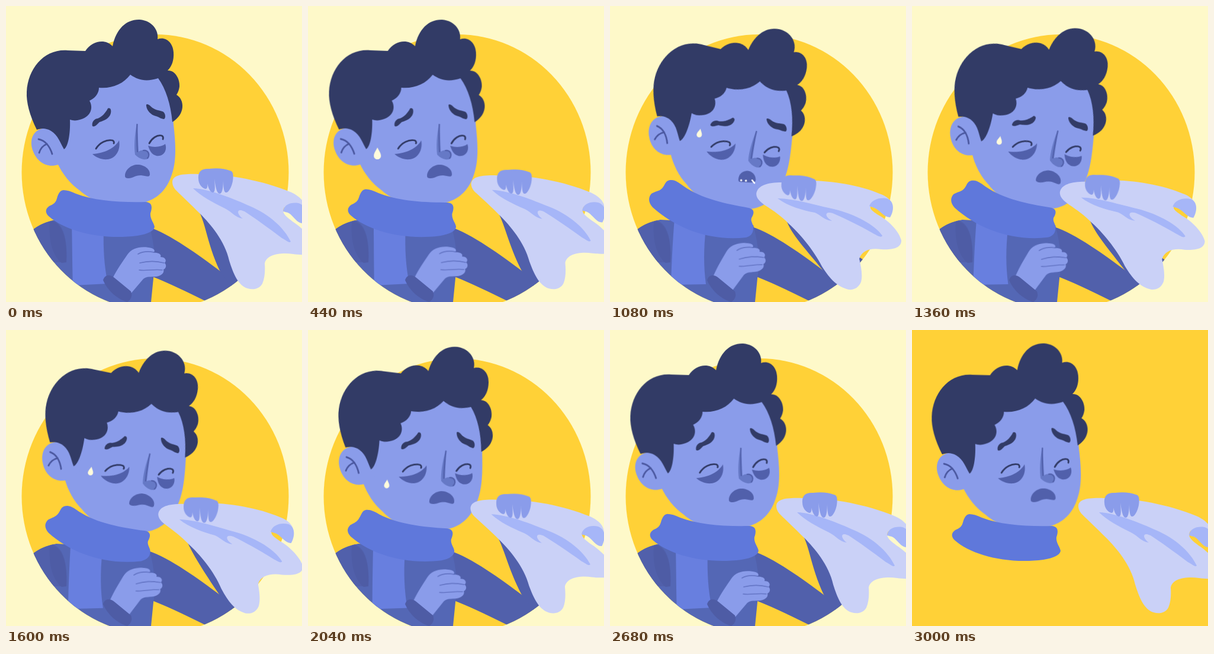
Write an HTML page without scripts that moves like this. It is 500x500 px and loops after 3040 ms.

```html
<!DOCTYPE html>
<html lang="en">
<head>
<meta charset="utf-8">
<title>Feeling unwell</title>
<style>
  html, body { margin: 0; width: 100%; height: 100%; overflow: hidden; background: #fef9c9; }
  svg { display: block; width: 100%; height: 100%; }

  .hair { fill: #323b66; }
  .skin { fill: #8a9cea; }
  .shade { fill: #5160ab; }
  .crease { fill: #a6b6f8; }
  .cream { fill: #fffbdc; }
  .line { fill: none; stroke-linecap: round; stroke-width: 2.8; }

  .move { animation: 3040ms cubic-bezier(.37, 0, .63, 1) infinite; }
  .head { transform-origin: 176px 332px; animation-name: nod; }
  .collar { animation-name: collar; }
  .tail { animation-name: tail; }
  .chest-hand { transform-origin: 190px 470px; animation-name: chest-hand; }
  .forearm { animation-name: forearm; }
  .tissue { animation-name: tissue; }
  .flap { animation-name: flap; }
  .fold { animation-name: fold; }
  .grip { transform-origin: 354px 296px; animation-name: grip; }
  .brow-l { transform-origin: 161px 188px; animation-name: brow-l; }
  .brow-r { transform-origin: 252px 179px; animation-name: brow-r; }
  .mouth { animation-name: mouth; }
  .teeth { animation-name: teeth; animation-timing-function: step-end; }
  .drop-a { animation-name: drop-a; animation-timing-function: linear; }
  .drop-b { animation-name: drop-b; animation-timing-function: linear; }
  .scene { animation-name: scene; animation-timing-function: step-end; }
  .flood { animation-name: flood; animation-timing-function: step-end; }

  @keyframes nod {
    0%, 6.58% { transform: rotate(0deg); }
    10.53% { transform: rotate(-.5deg); }
    36.84% { transform: rotate(11.8deg); }
    94.08%, 100% { transform: rotate(-.5deg); }
  }
  @keyframes collar {
    0%, 9%, 92%, 100% { d: path("M97 311C103 311 110 313 118 317C150 329 190 332 236 331C246 332 248 338 244 350C243 360 250 366 251 373C250 380 240 385 222 388C160 396 100 380 72 355C66 349 66 343 73 338C88 332 84 326 89 317C91 313 94 311 97 311Z"); }
    36.84% { d: path("M103 294C109 293 116 298 124 304C155 326 195 334 234 341C243 343 245 348 239 358C237 364 242 368 242 374C242 382 240 388 230 391C170 398 112 376 72 340C65 332 64 324 70 317C80 311 86 314 92 302C95 296 98 294 103 294Z"); }
  }
  @keyframes tail {
    0%, 9%, 92%, 100% { d: path("M111 365L165 378C164 410 166 440 172 469L113 472C112 440 112 410 111 365Z"); }
    36.84% { d: path("M109 358L162 375C158 410 158 440 162 470L103 471C104 440 105 410 109 358Z"); }
  }
  @keyframes chest-hand {
    0%, 9%, 92%, 100% { transform: none; }
    36.84% { transform: translate(-5px, -4px) rotate(-4deg); }
  }
  @keyframes forearm {
    0%, 6.58%, 79.6%, 100% { d: path("M322 340C338 364 338 398 361 447L385 480L430 440L350 350Z"); }
    36.84% { d: path("M298 362C306 386 332 412 360 447L385 480L430 430L330 365Z"); }
  }
  @keyframes tissue {
    0%, 6.58%, 79.6%, 100% { d: path("M281 297C282 286 296 283 325 284C370 283 432 294 480 314C494 320 506 330 505 342C500 336 480 330 470 340C464 350 474 356 484 364C500 374 520 395 524 408C524 422 500 421 485 419C462 416 440 420 437 435C438 448 437 460 433 469C428 478 418 480 408 477C392 472 384 452 377 430C370 397 345 368 328 351C312 335 298 322 288 312C283 307 281 302 281 297Z"); }
    36.84% { d: path("M247 317C249 303 266 298 290 298C340 290 412 298 455 317C470 322 480 332 477 345C470 338 448 331 442 336C435 342 445 347 453 353C470 362 488 380 492 396C492 410 475 412 458 411C440 408 425 413 421 427C424 440 427 455 424 466C420 476 412 480 403 479C384 474 372 462 358 440C344 412 318 382 302 368C290 355 276 346 264 338C253 331 247 325 247 317Z"); }
  }
  @keyframes flap {
    0%, 6.58%, 79.6%, 100% { d: path("M468 347C469 335 482 331 494 333C510 338 508 355 502 367C492 368 486 355 478 350C474 348 471 348 468 347Z"); }
    36.84% { d: path("M438 338C442 326 458 322 470 326C481 332 479 348 473 357C464 357 458 348 450 343C446 340 442 340 438 338Z"); }
  }
  @keyframes fold {
    0%, 6.58%, 79.6%, 100% { d: path("M316 308C345 309 385 326 412 338C445 352 470 375 481 398C478 401 474 396 466 392C445 376 420 358 403 347C388 340 390 352 400 359C388 358 382 348 370 342C350 332 330 322 316 308Z"); }
    36.84% { d: path("M283 325C310 325 350 337 378 343C415 352 448 370 460 388C458 392 452 388 446 385C420 370 395 358 376 350C362 346 362 356 375 363C362 362 356 353 346 349C325 345 300 338 283 325Z"); }
  }
  @keyframes grip {
    0%, 6.58%, 79.6%, 100% { transform: none; }
    36.84% { transform: translate(-36px, 12px) rotate(4deg); }
  }
  @keyframes brow-l {
    0%, 14%, 65%, 100% { transform: none; }
    36.2% { transform: translate(1px, 8px) rotate(19deg); }
  }
  @keyframes brow-r {
    0%, 14%, 65%, 100% { transform: none; }
    36.2% { transform: translate(0, 4px) rotate(-18deg); }
  }
  @keyframes mouth {
    0%, 27.6%, 44.7%, 100% { d: path("M201 287C201 276 212 268 222 268C234 268 244 276 243 285C242 290 236 287 228 286C218 286 214 291 207 291C203 291 201 290 201 287Z"); }
    36.2% { d: path("M208 284C207 275 214 269 221 268C230 267 236 274 237 281C237 285 232 286 226 287C220 288 216 288 212 289C209 289 208 287 208 284Z"); }
  }
  @keyframes teeth {
    0%, 40.8% { opacity: 0; }
    32.9% { opacity: 1; }
  }
  @keyframes drop-a {
    0%, 8% { opacity: 0; transform: translate(117px, 241px); }
    11.5% { opacity: 1; }
    26% { opacity: 1; }
    29.6%, 100% { opacity: 0; transform: translate(117px, 268px); }
  }
  @keyframes drop-b {
    0%, 20.4% { opacity: 0; transform: translate(127px, 214px); }
    22.37% { opacity: .5; transform: translate(127px, 215px); }
    25% { opacity: 1; }
    35.5% { transform: translate(128px, 222px); }
    52.6% { transform: translate(128px, 245px); }
    67.1% { transform: translate(127px, 264px); }
    73% { opacity: 1; }
    76.3%, 100% { opacity: 0; transform: translate(127px, 274px); }
  }
  @keyframes scene {
    0% { visibility: visible; }
    98.684%, 100% { visibility: hidden; }
  }
  @keyframes flood {
    0% { visibility: hidden; }
    98.684%, 100% { visibility: visible; }
  }
</style>
</head>
<body>
<svg viewBox="0 0 500 500">
  <defs>
    <clipPath id="disc"><ellipse cx="252" cy="281" rx="225.5" ry="233"/></clipPath>
    <path id="drop" d="M0-10C2-5 6-1 6 4C6 8 3 10 0 10C-3 10-6 8-6 4C-6-1-2-5 0-10Z"/>
  </defs>

  <rect width="500" height="500" fill="#fef9c9"/>
  <ellipse cx="252" cy="281" rx="225.5" ry="233" fill="#ffd137"/>
  <rect class="move flood" width="500" height="500" fill="#ffd137"/>

  <!-- Body and arms, cut by the disc -->
  <g class="move scene" clip-path="url(#disc)">
    <path class="shade" d="M240 373C277 385 326 421 362 448L400 440L420 520L380 520C340 500 290 474 247 457Z"/>
    <path class="move forearm shade" d="M322 340L361 447L430 440Z"/>
    <path fill="#5467b5" d="M30 392C48 373 62 366 85 361L242 370C250 400 254 430 249 460L245 500V520H30Z"/>
    <path class="shade" d="M30 392C48 373 62 366 80 362C98 370 104 395 102 433H30Z"/>
    <path fill="#4e5ca5" d="M74 364C94 363 104 392 102 433L94 434C76 420 72 390 74 364Z"/>
    <path class="move tail" fill="#687fdf" d="M111 365L165 378L172 469L113 472Z"/>
    <g class="move chest-hand">
      <path class="skin" d="M180 460C188 444 197 432 205 420C213 408 230 405 246 409C252 411 252 415 248 417C258 416 263 420 261 424C269 424 272 430 268 434C272 438 270 444 266 445C268 451 262 456 254 457C244 458 238 456 232 461L209 488Z"/>
      <g class="line" stroke="#6475c5" style="stroke-width:1.6">
        <path d="M250 416C240 414 230 415 223 419"/>
        <path d="M267 434C252 430 238 431 226 434"/>
        <path d="M264 446C250 444 236 448 225 446"/>
      </g>
    </g>
    <path fill="#4e5ca5" d="M164 463C167 453 176 453 183 459L211 482C214 490 211 496 205 500C190 496 172 482 164 463Z"/>
  </g>

  <!-- Head -->
  <g class="move head">
    <path class="skin" d="M120 110L256 116C276 142 282 175 283 200C287 235 288 262 280 285C272 310 256 325 236 331C200 345 150 335 125 312C108 300 95 283 87 266L90 200Z"/>
    <path class="skin" d="M104 225C88 208 70 204 58 208C42 214 40 232 46 246C53 264 70 274 88 268L110 250Z"/>
    <path class="hair" d="M98 242C92 232 88 218 76 211C66 205 58 207 52 209C40 185 34 162 35 145C37 105 65 72 104 75L134 76C146 58 168 55 180 68C186 38 204 22 226 23C248 25 258 42 256 56C270 51 282 62 283 78C284 92 280 102 273 109C286 108 294 124 293 136C292 143 290 147 288 150C302 158 303 183 281 196C278 165 270 140 257 122C238 128 224 126 210 116C198 132 178 140 157 138C157 148 150 156 141 160C148 172 143 186 128 191C120 194 114 194 108 192C109 215 105 238 98 242Z"/>
    <g class="line" stroke="#4a579f">
      <path d="M55 225C66 227 74 237 78 250"/>
      <path d="M69 233C62 236 58 241 56 248"/>
    </g>

    <path class="shade" d="M146 250C166 249 184 240 191 227C194 243 186 257 172 259C162 260 152 256 146 250Z"/>
    <path class="shade" d="M240 236C252 240 264 237 269 233C273 244 266 255 254 253C247 251 243 246 240 236Z"/>
    <g class="line" stroke="#323b66">
      <path d="M152 241C158 231 170 225 180 227C182 228 183 230 182 232"/>
      <path d="M242 232C246 224 255 217 263 219C265 220 266 222 265 225"/>
    </g>

    <path fill="#6679c6" d="M221 198C217 220 216 238 218 251C223 256 227 258 232 259C238 260 243 258 242 250C241 242 230 242 224 246C223 230 223 213 221 198Z"/>
    <g class="line" stroke="#5160ab" style="stroke-width:2.2">
      <path d="M221.500 200C221 215 221 232 222 246"/>
      <path d="M232 244C240 243 244 251 239 257"/>
    </g>

    <path class="move brow-l hair" d="M146 203C144 196 150 190 155 190C162 187 168 181 172 173C177 171 178 176 177 181C175 190 165 194 158 196C154 200 150 205 146 203Z"/>
    <path class="move brow-r hair" d="M237 169C236 164 241 166 245 170C250 175 257 176 264 178C270 180 270 190 267 191C262 191 258 187 253 186C245 184 238 177 237 169Z"/>

    <path class="move mouth shade" d="M201 287C201 276 212 268 222 268C234 268 244 276 243 285C242 290 214 291 207 291Z"/>
    <g class="move teeth" fill="#fff">
      <circle cx="213" cy="286" r="1.7"/>
      <circle cx="221" cy="285" r="1.7"/>
      <path class="line" stroke="#fff" style="stroke-width:2.4" d="M231 282L236 286"/>
    </g>

    <g class="move drop-a"><use href="#drop" class="cream"/></g>
    <g class="move drop-b"><use href="#drop" class="cream" transform="scale(.74)"/></g>
  </g>

  <path class="move collar" fill="#5f78db" d="M97 311L236 331L251 373L72 355Z"/>

  <!-- Tissue and the hand that holds it -->
  <path class="move tissue" fill="#cad1f7" d="M281 297L480 315L408 477Z"/>
  <path class="move flap crease" d="M468 347L494 334L502 367Z"/>
  <path class="move fold crease" d="M316 308L398 344L481 398Z"/>
  <path class="move grip skin" d="M325 292C324 280 330 274 343 275C358 273 370 275 378 278C385 279 384 288 383 296C381 306 376 316 371 315C368 314 367 306 367 292C367 304 366 317 361 317C356 317 354 306 352 292C353 304 354 316 349 315C344 314 340 304 339 292C341 302 341 309 337 309C331 308 325 300 325 292Z"/>
</svg>
</body>
</html>
```
